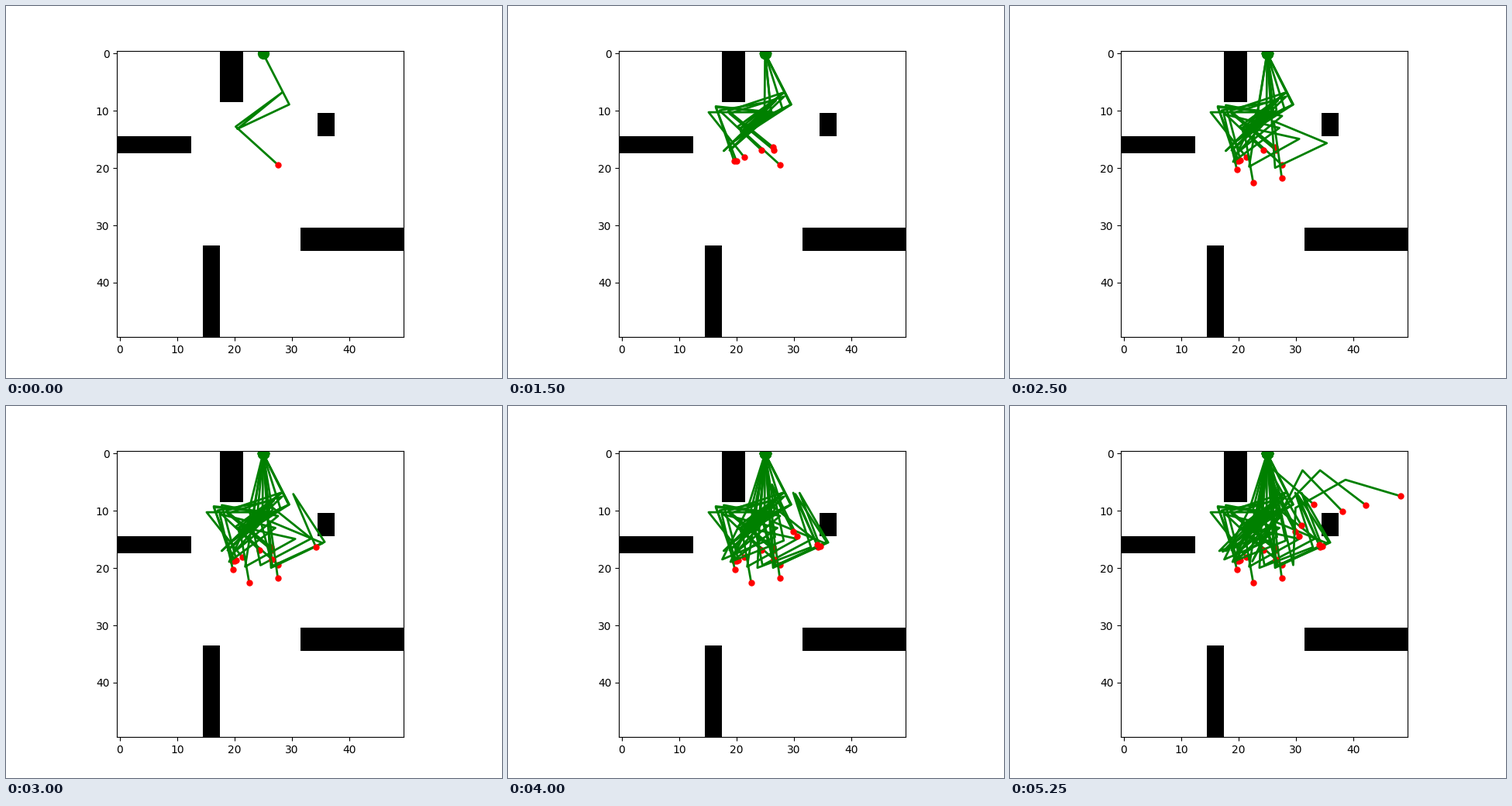
These frames come from a looping animation (640x480 px, 5500 ms). A matplotlib script:

```python
import numpy as np
import matplotlib.pyplot as plt
from matplotlib.animation import FuncAnimation

SIZE = 50
LINK = 10
BASE = (25, 0)
STEP_MS = 250

# Obstacles as (left, top, width, height) in grid cells.
OBSTACLES = [(18, 0, 4, 9), (0, 15, 13, 3), (35, 11, 3, 4),
             (32, 31, 18, 4), (15, 34, 3, 16)]

# Heading of each of the five links in degrees, clockwise from the x axis.
POSES = [
    (62.8, 154.8, -39.1, 143.7, 42.1),
    (63.5, 147, -43.5, 162.8, 39.5),
    (63, 151.5, -43, 161.6, 39),
    (72.5, 145.4, -44.5, 170, 43.4),
    (90.5, 135.5, -42.5, 180, 51.6),
    (84.2, 136.1, -41, 185.5, 69),
    (84, 136, -41.5, 186, 71.5),
    (80.6, 132.3, -39.5, 190.9, 75.2),
    (99.4, 115.4, -36.2, 194, 76.7),
    (99, 99, -29, 192.5, 80),
    (86, 86, -25.5, 202.5, 82),
    (104, 78.6, -27.8, 218.7, 84.5),
    (95.3, 75, -24.7, 236.8, 66.9),
    (94.5, 74.5, -24, 240, 69),
    (95, 92.6, -21, 252, 65.2),
    (100.6, 114.8, -21.7, 258.2, 64.1),
    (107.6, 116.4, -23, 262, 63),
    (97.4, 134.8, -18.1, 269, 60),
    (94.4, 134.2, -28.4, 267.3, 40.6),
    (95, 117.6, -44.2, -63.1, 45.8),
    (79.7, 115.9, -61, -45.7, 37.3),
    (76.8, 76.8, -87.7, -29.3, 16.5),
]


def joints(headings):
    """Positions of the base, every joint and the tip."""
    angles = np.radians(headings)
    steps = LINK * np.column_stack([np.cos(angles), np.sin(angles)])
    return np.vstack([BASE, BASE + np.cumsum(steps, axis=0)])


def draw_arm(ax, headings):
    points = joints(headings)
    link, = ax.plot(points[:, 0], points[:, 1], color="green", lw=2)
    base, = ax.plot(*BASE, "o", color="green", ms=10)
    tip, = ax.plot(*points[-1], "o", color="red", ms=5)
    return link, base, tip


grid = np.ones((SIZE, SIZE))
for left, top, width, height in OBSTACLES:
    grid[top:top + height, left:left + width] = 0

fig, ax = plt.subplots(figsize=(6.4, 4.8), dpi=100)
ax.imshow(grid, cmap="gray", vmin=0, vmax=1)
ax.set_autoscale_on(False)
arms = [draw_arm(ax, pose) for pose in POSES]


def update(frame):
    for index, arm in enumerate(arms):
        for artist in arm:
            artist.set_visible(index <= frame)
    return [artist for arm in arms for artist in arm]


anim = FuncAnimation(fig, update, frames=len(POSES), interval=STEP_MS,
                     repeat=True, repeat_delay=0)
plt.show()
```
